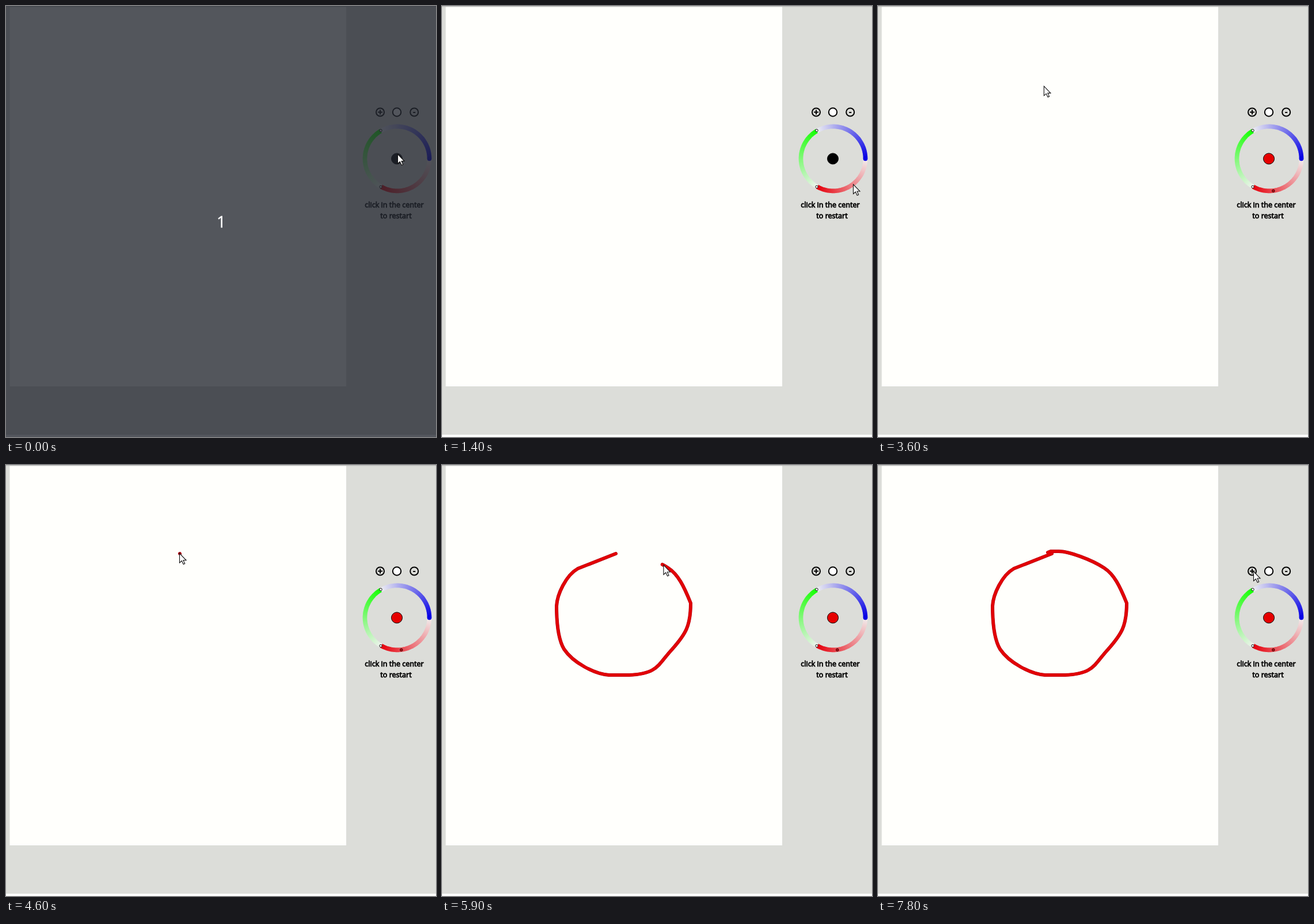
An HTML page that plays this animation: 747x749 px, repeating every 8000 ms.

```html
<!DOCTYPE html>
<html lang="en">
<head>
<meta charset="utf-8">
<title>Drawing pad</title>
<style>
  html, body { margin: 0; width: 100%; height: 100%; overflow: hidden; background: #dcddd9; }
  svg { display: block; width: 747px; height: 749px; }
  text { font-family: "Open Sans", "Noto Sans", sans-serif; text-anchor: middle; }
  .hint { font-size: 12.6px; stroke: #000; stroke-width: .8; }
  .icon { fill: none; stroke: #000; stroke-width: 2; }
  .knob { fill: #fff; stroke: #111; stroke-width: 1; }
  .ink { fill: none; stroke-linecap: round; stroke-linejoin: round; }
</style>
</head>
<body>
<svg viewBox="0 0 747 749">
  <rect width="747" height="749" fill="#dcddd9"/>
  <rect y="745" width="747" height="4" fill="#fffffe"/>
  <rect x="6.5" y="1" width="584.5" height="660" fill="#fffffc"/>
  <rect width="747" height="1.5" fill="#b9bab8"/>

  <g class="icon">
    <circle cx="650" cy="184.500" r="7"/>
    <path d="M646 184.500h8M650 180.500v8"/>
    <circle cx="679" cy="184.500" r="7.200" fill="#fff"/>
    <circle cx="709.200" cy="184.500" r="7"/>
    <path d="M707.200 185h4"/>
  </g>
  <g id="ring" fill="none" stroke-width="7.600"></g>
  <circle class="knob" cx="651" cy="216.300" r="2.200"/>
  <circle class="knob" cx="651" cy="314.300" r="2.200"/>
  <circle id="picked" class="knob" cx="686.800" cy="321.300" r="2.200" style="fill:#d4000c"/>
  <circle id="swatch" cx="679" cy="265.400" r="9.500" stroke="#000"/>
  <text class="hint" x="674.500" y="350">click in the center</text>
  <text class="hint" x="677.500" y="369">to restart</text>

  <g id="drawing" class="ink">
    <path id="edge" stroke="#a8000c" stroke-width="6"
          d="M302 154L236 180C215 192 200 225 199 245C199 280 203 305 212 320
             C228 344 265 363 290 365H325C375 363 375 347 400 320C423 294 432 280 432 240
             C420 210 410 190 393 179C372 165 330 149 312 150H300L295 152"/>
    <path id="core" stroke="#e20006" stroke-width="5"/>
  </g>

  <g id="shade">
    <rect width="747" height="749" fill="#232730" fill-opacity=".78"/>
    <text x="374" y="385" font-size="28" fill="#fff" stroke="#fff" stroke-width=".4">1</text>
  </g>
  <path id="cursor" d="M0 0V16.500L3.800 13L6.700 19L9.200 18L6.500 12H11.500Z"
        fill="#fff" stroke="#111" stroke-width="1.100"/>
</svg>

<script>
const $ = id => document.getElementById(id);
const LOOP = 8000, STEP = 100, PICK = 2000, DOWN = 4600, UP = 6300;

// One third of the ring: solid at `start` degrees, fading anticlockwise
function arc(start, rgb) {
  const spot = deg => {
    const a = deg * Math.PI / 180;
    return `${679.5 + 56 * Math.cos(a)} ${265.4 - 56 * Math.sin(a)}`;
  };
  let out = "";
  for (let d = 118; d >= 0; d -= 2) {
    const color = rgb.map(c => Math.round(c + (242 - c) * d / 120));
    out += `<path d="M${spot(start + d)}A56 56 0 0 0 ${spot(start + d + 2.6)}" stroke="rgb(${color})"/>`;
  }
  return out;
}
$("ring").innerHTML = arc(240, [230, 0, 12]) + arc(120, [22, 255, 4]) + arc(0, [6, 0, 228])
  + `<circle cx="735.5" cy="265.4" r="3.800" fill="#0600e4"/>`;

$("core").setAttribute("d", $("edge").getAttribute("d"));
const inkLength = $("edge").getTotalLength();

// Steady pace that slows towards the end
function inkDrawn(t) {
  const p = Math.min(1, Math.max(0, (t - DOWN) / (UP - DOWN)));
  return inkLength * (p + p ** 3 * (1 - p));
}

// Pointer moves: start, end, x, y; it rests in between
const moves = [
  [0, 100, 680.5, 292], [100, 300, 680, 324], [700, 900, 703, 324], [1000, 1200, 724, 309],
  [1300, 1700, 686, 313], [2200, 2500, 636.5, 241], [2500, 2800, 632, 247],
  [3000, 3300, 317, 137], [3500, 3800, 231, 144], [3800, 4100, 301.5, 153.5],
  [UP, UP + STEP, 295, 152], [6700, 7500, 658, 183], [7600, 7700, 652.5, 185]
];

function pointer(t) {
  if (t > DOWN && t < UP) {
    const head = $("edge").getPointAtLength(inkDrawn(t));
    return [head.x + 2, head.y + 1];
  }
  let x = 680.5, y = 257.5;
  for (const [start, end, toX, toY] of moves) {
    const k = Math.min(1, Math.max(0, (t - start) / (end - start)));
    x += (toX - x) * k;
    y += (toY - y) * k;
  }
  return [x, y];
}

function show(id, on) {
  $(id).setAttribute("visibility", on ? "visible" : "hidden");
}

function draw(t) {
  show("shade", t < STEP);
  show("picked", t >= PICK);
  show("drawing", t >= DOWN);
  show("core", t > DOWN);
  $("swatch").setAttribute("fill", t < PICK ? "#000" : "#e60000");
  $("drawing").setAttribute("stroke-dasharray", `${Math.max(.01, inkDrawn(t))} ${inkLength + 9}`);
  $("cursor").setAttribute("transform", `translate(${pointer(t)})`);
}

const begin = performance.now();
function tick() {
  const t = (performance.now() - begin) % LOOP;
  draw(Math.floor(t / STEP) * STEP);
  requestAnimationFrame(tick);
}
tick();
</script>
</body>
</html>
```
